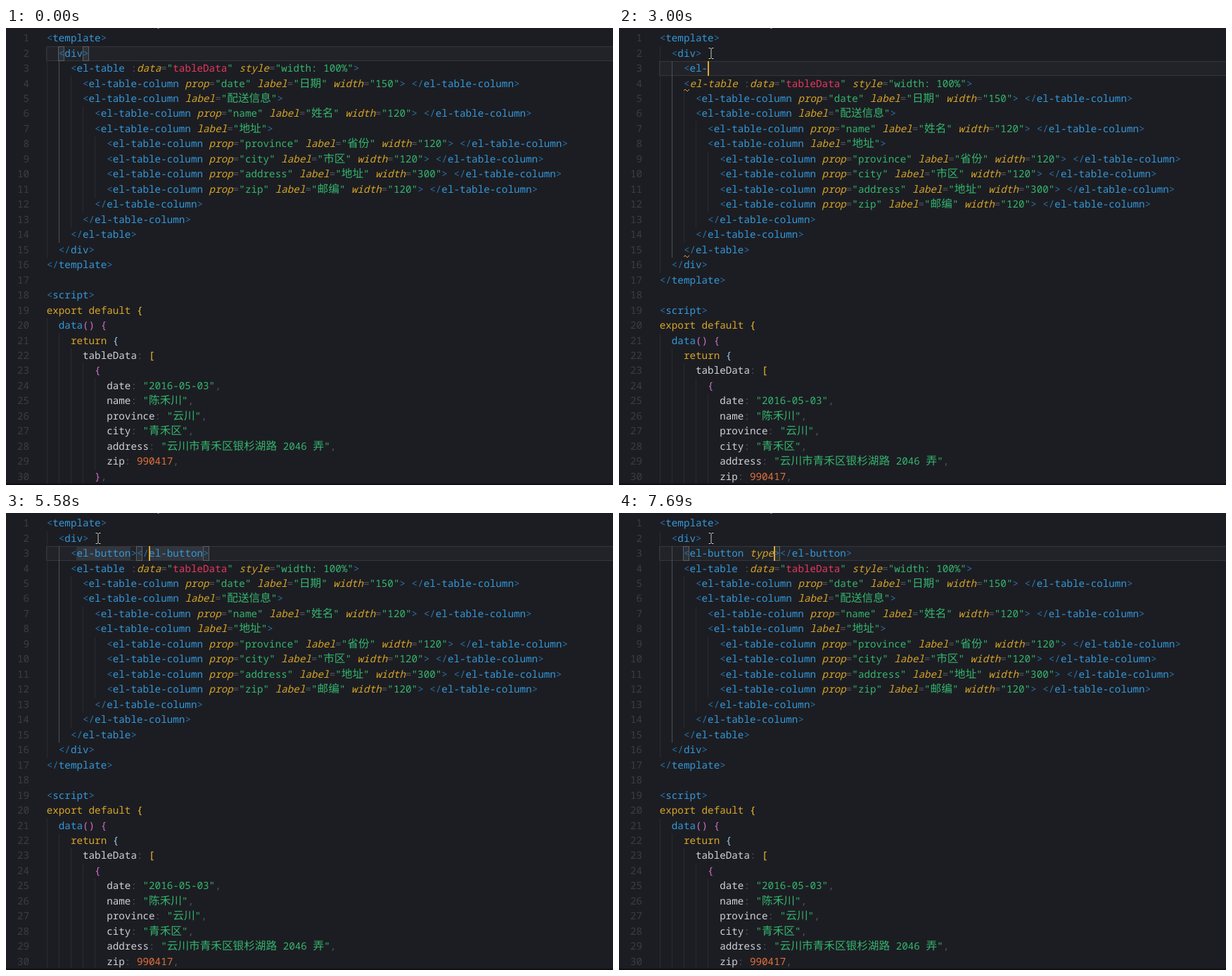
Recreate the animation shown at these times as an HTML page. Size 863 px wide and 649 px high, loop 8 s.

```html
<!DOCTYPE html>
<html lang="zh">
<head>
<meta charset="utf-8">
<title>Code editor</title>
<style>
:root { --ch: 8.55px; --row: 21.47px; --x0: 57.7px; --y0: 4.1px; }
html, body { margin: 0; width: 100%; height: 100%; overflow: hidden; background: #1c1d22; }
#stage {
  position: relative; width: 863px; height: 649px; overflow: hidden;
  background: #1c1d22; color: #cfd1d6;
  font: 14.25px/21.47px "Noto Sans Mono", "DejaVu Sans Mono", monospace;
  text-rendering: geometricPrecision; font-variant-ligatures: none;
}
#stage div, #stage svg { position: absolute; }
.line, .num { white-space: pre; height: var(--row); }
.line { left: var(--x0); }
.num { left: 0; width: 33px; text-align: right; color: #3a3d45; }
.guide { top: 0; width: 1px; height: 22px; background: #292b31; }
.cjk { font: 300 15.65px/0 "Noto Sans CJK SC", "Noto Sans CJK", sans-serif; }
.pun { color: #2a70a8; }
.tag { color: #3498db; }
.attr, .broken .tag { color: #d6a428; font-style: italic; }
.str { color: #34b56f; }
.bound { color: #e8365f; }
.key { color: #d9a52a; }
.number { color: #e3713a; }
.dim { color: #50535b; }
.b0 { color: #f0bd2f; }
.b1 { color: #cf6fc9; }
.b2 { color: #9ccbe8; }
#current {
  left: 57px; width: 810px; height: 21px; box-sizing: border-box;
  background: #212328; border: 1px solid #34363c;
}
#active { left: 75px; top: 47px; width: 1px; background: #4d5058; }
#caret { width: 2px; height: 21px; background: #dca92c; }
.word { height: 20px; background: #32353b; }
.bracket { width: 9px; height: 21px; box-sizing: border-box; background: #2b3338; border: 1px solid #5b5e64; }
#popup { top: 69px; }
#list, #detail { background: #1c1d22; border: 1px solid #101114; box-sizing: border-box; white-space: pre; }
#list { left: 0; width: 421px; }
#detail { left: 420px; width: 324px; height: 60px; }
.item { left: 0; width: 419px; height: var(--row); text-indent: 22px; color: #c3c5ca; }
.item.on { background: #44464b; }
.item svg { left: 3px; top: 4px; }
#thumb { right: 0; top: 23.5px; width: 9px; height: 33px; background: #44464b; }
#head { left: 6px; top: 2px; color: #8b8d93; }
#note { left: 5px; top: 35px; color: #c3c5ca; }
#speck { left: 215px; top: 0; width: 3px; height: 1px; background: #777a80; }
#base { left: 0; top: 647px; width: 863px; height: 2px; background: #0e0e13; }
</style>
</head>
<body>
<div id="stage">
  <div id="current"></div>
  <div id="marks"></div>
  <div id="code"></div>
  <div id="active"></div>
  <svg id="waves" width="12" height="330" style="left:92px;top:0" fill="none" stroke="#d99a55">
    <path d="M0 89l2-2 3 3 3-3M0 325l2-2 3 3 3-3"/>
  </svg>
  <div id="caret"></div>
  <div id="popup"></div>
  <div id="speck"></div>
  <div id="base"></div>
  <svg id="mouse" width="10" height="18" fill="none">
    <path d="M1.5 1.5H4L5 2.5L6 1.5H8.5M5 2.5V15.5M1.5 16.5H4L5 15.5L6 16.5H8.5" stroke="#000" stroke-width="2.4"/>
    <path d="M1.5 1.5H4L5 2.5L6 1.5H8.5M5 2.5V15.5M1.5 16.5H4L5 15.5L6 16.5H8.5" stroke="#e8e8e8"/>
  </svg>
</div>
<script>
const LOOP = 8000, CH = 8.55, ROW = 21.47, X0 = 57.7, Y0 = 4.1;
const $ = id => document.getElementById(id);

const markup = `<template>
  <div>
    <el-table :data="tableData" style="width: 100%">
      <el-table-column prop="date" label="日期" width="150"> </el-table-column>
      <el-table-column label="配送信息">
        <el-table-column prop="name" label="姓名" width="120"> </el-table-column>
        <el-table-column label="地址">
          <el-table-column prop="province" label="省份" width="120"> </el-table-column>
          <el-table-column prop="city" label="市区" width="120"> </el-table-column>
          <el-table-column prop="address" label="地址" width="300"> </el-table-column>
          <el-table-column prop="zip" label="邮编" width="120"> </el-table-column>
        </el-table-column>
      </el-table-column>
    </el-table>
  </div>
</template>

<script>`.split("\n");

const script = `export default {
  data() {
    return {
      tableData: [
        {
          date: "2016-05-03",
          name: "陈禾川",
          province: "云川",
          city: "青禾区",
          address: "云川市青禾区银杉湖路 2046 弄",
          zip: 990417,
        },`.split("\n");

const esc = s => s.replace(/</g, "&lt;").replace(/>/g, "&gt;")
  .replace(/[\u4e00-\u9fff]+/g, '<span class="cjk">$&</span>');
const span = (cls, s) => s ? `<span class="${cls}">${esc(s)}</span>` : "";

function paintMarkup(line) {
  const token = /(<\/?)([\w-]*)|(>)|(:?)([\w-]+)(?:(=)"([^"]*)")?/g;
  return line.replace(token, (m, open, tag, close, colon, attr, eq, value) => {
    if (open) return span("pun", open) + span("tag", tag);
    if (close) return span("pun", close);
    const quoted = eq ? span("dim", eq) + span("str", '"') +
      span(colon ? "bound" : "str", value) + span("str", '"') : "";
    return span("dim", colon) + span("attr", attr) + quoted;
  });
}

let depth = 0;
function paintScript(line) {
  return line.replace(/"[^"]*"|\w+|[:,]|[{(\[]|[})\]]/g, m => {
    if (m[0] === '"') return span("str", m);
    if (/^\d/.test(m)) return span("number", m);
    if (/export|default|return/.test(m)) return span("key", m);
    if (m === "data") return span("tag", m);
    if (/[:,]/.test(m)) return span("dim", m);
    if (/[{(\[]/.test(m)) return span("b" + depth++ % 3, m);
    if (/[})\]]/.test(m)) return span("b" + --depth % 3, m);
    return m;
  });
}

function guides(indent) {
  let html = "";
  for (let c = 0; c < indent; c += 2) html += `<div class="guide" style="left:${c * CH}px"></div>`;
  return html;
}

const rowTop = n => Y0 + ROW * n;
function addRow(cls, html, n) {
  const el = document.createElement("div");
  el.className = cls;
  el.innerHTML = html;
  el.style.top = rowTop(n) + "px";
  $("code").append(el);
  return el;
}

const painted = [...markup.map(paintMarkup), ...script.map(paintScript)];
const lines = [...markup, ...script].map((src, n) =>
  addRow("line", guides(src.search(/\S|$/)) + painted[n], n));
const typed = addRow("line", "", 2);
for (let n = 0; n < 30; n++) addRow("num", n + 1, n);

const tags = ["html", "head", "title", "base", "link", "meta", "style", "script", "noscript", "body", "section", "nav"];
const elTags = ["row", "col", "container", "header", "aside", "main", "footer", "radio", "input", "select", "switch", "slider"].map(s => "el-" + s);
const bTags = ["button", "button-group", "badge", "breadcrumb", "breadcrumb-item", "table", "tabs", "tab-pane", "submenu", "tabs", "checkbox", "scrollbar"].map(s => "el-" + s);
const attrs = ["type", "key", "ref", "slot", "slot-scope", "v-bind", "v-cloak", "v-else", "v-else-if", "v-for", "v-html", "v-if"];
const tAttrs = ["type", "native-type", "slot", "slot-scope", "v-html", "v-text"];
const list = (items, head, note) => ({ items, head, note });
const buttons = n => list(bTags.slice(0, n), "el-button", "按钮");
const types = items => list(items, "el-button Attribute", "类型");

const pair = "<el-button></el-button>";
const withAttr = s => `<el-button ${s}></el-button>`;

// Each step patches the state from its time on; marks and caret are in columns.
const steps = [
  [0, { text: null, caret: null, marks: [2, 6], words: false, waves: false, broken: false, popup: null, guide: 12, mouse: null }],
  [130, { mouse: [777, 603] }],
  [210, { mouse: [700, 420] }],
  [290, { mouse: [600, 250] }],
  [370, { mouse: [480, 130] }],
  [450, { mouse: [370, 55] }],
  [530, { mouse: [260, 14] }],
  [610, { mouse: [180, 9] }],
  [690, { mouse: [131, 32] }],
  [840, { mouse: [131, 36] }],
  [1010, { mouse: [135, 32], caret: 7 }],
  [1070, { mouse: [131, 36] }],
  [1530, { caret: null }],
  [1760, { text: "", caret: 4, marks: null }],
  [1840, { guide: 13 }],
  [2070, { text: "<", caret: 5 }],
  [2150, { popup: list(tags, "html", "标签") }],
  [2230, { text: "<e", caret: 6, popup: list(elTags, "el-row", "布局") }],
  [2300, { text: "<el", caret: 7, popup: null }],
  [2380, { broken: true }],
  [2610, { waves: true }],
  [2910, { caret: null }],
  [3000, { text: "<el-", caret: 8 }],
  [3470, { text: "<el-b", caret: 9, popup: buttons(12) }],
  [3540, { text: "<el-bu", caret: 10, popup: buttons(9) }],
  [3620, { text: "<el-but", caret: 11 }],
  [4080, { text: pair, caret: 27, popup: null }],
  [4160, { broken: false }],
  [4240, { marks: [15, 26] }],
  [4390, { waves: false }],
  [4710, { caret: 26 }],
  [4880, { caret: 25 }],
  [5100, { words: true }],
  [5350, { caret: 24 }],
  [5420, { caret: 22 }],
  [5500, { caret: 19 }],
  [5580, { caret: 17 }],
  [5680, { caret: 16, words: false }],
  [5910, { caret: 15 }],
  [6060, { caret: 14, marks: [4, 14] }],
  [6140, { words: true }],
  [6290, { text: withAttr(""), caret: 15, marks: [4, 15], words: false }],
  [6430, { popup: types(attrs) }],
  [6760, { text: withAttr("t"), caret: 16, marks: [4, 16], popup: types(tAttrs) }],
  [6910, { text: withAttr("ty"), caret: 17, marks: [4, 17], popup: types(tAttrs.slice(0, 2)) }],
  [7290, { text: withAttr("typ"), caret: 18, marks: [4, 18] }],
  [7610, { text: withAttr("type"), caret: 19, marks: [4, 19] }],
  [7690, { popup: null }]
];

const icon = `<svg width="15" height="14" fill="none" stroke="#e3a04a" stroke-width="1.3">
  <path d="M5.7 1.7h7.6v5.6H5.7zM8 4h3.5M1 6.7h7.5v5.6H1zM3 9h3.5"/></svg>`;

function popupHtml({ items, head, note }) {
  const rows = items.map((s, i) =>
    `<div class="item${i ? "" : " on"}" style="top:${i * ROW}px">${icon}${s}</div>`).join("");
  const thumb = items.length > 11 ? '<div id="thumb"></div>' : "";
  return `<div id="detail"><div id="head">${head}</div><div id="note">${esc(note)}</div></div>
    <div id="list" style="height:${items.length * ROW + 2}px">${rows}${thumb}</div>`;
}

function show(el, on) { el.style.display = on ? "" : "none"; }

function render(s) {
  const inserted = s.text !== null, row = inserted ? 2 : 1;
  const top = Math.round(rowTop(row));
  const colX = c => X0 + c * CH;

  lines.forEach((el, n) => el.style.top = rowTop(n + (inserted && n > 1)) + "px");
  lines[2].classList.toggle("broken", s.broken);
  show(typed, inserted);
  if (inserted) typed.innerHTML = guides(4) + "    " + paintMarkup(s.text);

  $("current").style.top = top + "px";
  $("active").style.height = s.guide * ROW + "px";
  show($("waves"), s.waves);

  const word = c => `<div class="word" style="left:${colX(c)}px;top:${top + 1}px;width:${9 * CH}px"></div>`;
  const bracket = c => `<div class="bracket" style="left:${Math.floor(colX(c))}px;top:${top}px"></div>`;
  $("marks").innerHTML = (s.words ? word(5) + word(17) : "") + (s.marks || []).map(bracket).join("");

  show($("caret"), s.caret !== null);
  $("caret").style.left = Math.floor(colX(s.caret)) + "px";
  $("caret").style.top = top + "px";

  $("popup").innerHTML = s.popup ? popupHtml(s.popup) : "";
  $("popup").style.left = Math.round(colX(s.caret)) + "px";

  show($("mouse"), s.mouse);
  if (s.mouse) {
    $("mouse").style.left = s.mouse[0] - 5 + "px";
    $("mouse").style.top = s.mouse[1] - 9 + "px";
  }
}

let shown = -1;
function tick() {
  const t = performance.now() % LOOP;
  const past = steps.filter(([at]) => at <= t);
  if (past.length !== shown) {
    shown = past.length;
    render(Object.assign({}, ...past.map(([, patch]) => patch)));
  }
  requestAnimationFrame(tick);
}
tick();
</script>
</body>
</html>
```
